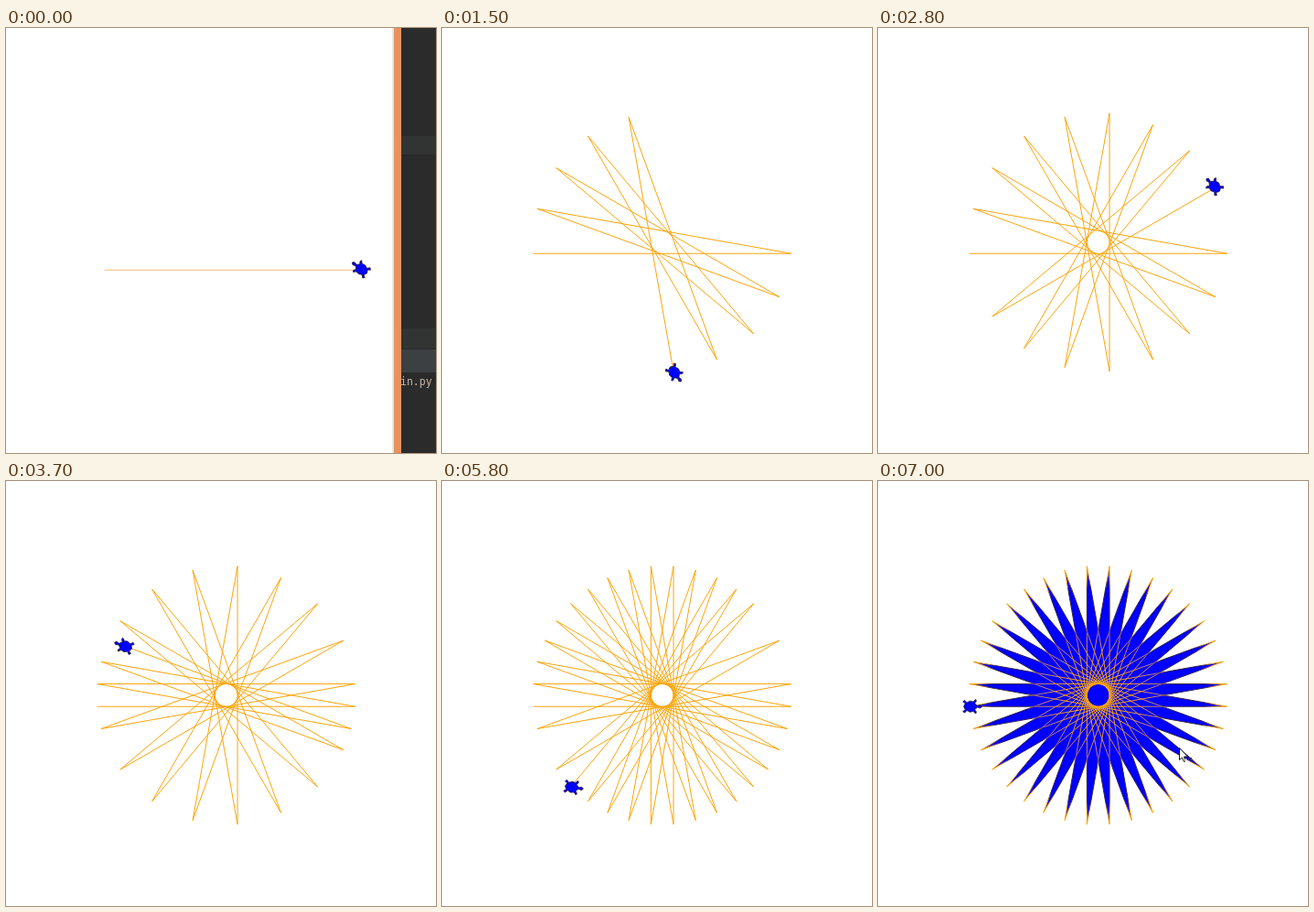
An HTML page with a canvas that plays this animation: 470x464 px, repeating every 7.1 s.

```html
<!DOCTYPE html>
<html lang="en">
<head>
<meta charset="utf-8">
<title>Turtle star</title>
<style>
  html, body { margin: 0; width: 100%; height: 100%; overflow: hidden; background: #fff; }
  canvas { display: block; }
</style>
</head>
<body>
<canvas id="stage" width="470" height="464"></canvas>
<script>
const ctx = document.getElementById('stage').getContext('2d');
const LOOP = 7100, STEP = 100;
const SIDES = 36, TURN = 170, TURN_SHARE = 0.45;
const CENTER = { x: 240.7, y: 233.9 }, RADIUS = 141.5;
const ORANGE = '#fba50a', BLUE = '#0000ff';
const FILL_TIME = 6600, POINTER_TIME = 7000;

// [time in ms, finished sides]; the fraction covers the turn, then the next side
const PACE = [[0, 1.38], [1500, 9.07], [2800, 16.28], [3700, 20.96],
              [4700, 26.38], [5800, 32.32], [6565, 36.45]];

// Right half of the turtle, from head to tail: [sideways, forward]
const HALF = [[0, 16], [2, 14], [1, 10], [4, 7], [7, 9], [9, 8], [6, 5],
              [7, 1], [5, -3], [8, -6], [6, -8], [4, -5], [0, -7]];
const SHELL = HALF.concat(HALF.slice(1, -1).reverse().map(([x, y]) => [-x, y]));
const POINTER = [[0, 0], [0, 13], [3, 10.5], [5, 15], [7, 14], [5, 9.5], [9, 9.5]];

const rad = deg => deg * Math.PI / 180;
const mix = (a, b, t) => a + (b - a) * t;

function corner(k) {
  const a = rad(185 + TURN * k);
  return { x: CENTER.x + RADIUS * Math.cos(a), y: CENTER.y - RADIUS * Math.sin(a) };
}

function phaseAt(time) {
  const i = PACE.findIndex(p => p[0] > time);
  if (i < 0) return PACE[PACE.length - 1][1];
  const [t0, p0] = PACE[i - 1], [t1, p1] = PACE[i];
  return mix(p0, p1, (time - t0) / (t1 - t0));
}

function poseAt(phase) {
  const done = Math.floor(phase), part = phase - done, from = corner(done);
  if (part <= TURN_SHARE || done >= SIDES) {
    const turned = Math.min(1, part / TURN_SHARE);
    return { done, ...from, heading: TURN * (done - 1 + turned) };
  }
  const to = corner(done + 1), f = (part - TURN_SHARE) / (1 - TURN_SHARE);
  return { done, x: mix(from.x, to.x, f), y: mix(from.y, to.y, f), heading: TURN * done };
}

function rect(color, x, y, w, h) {
  ctx.fillStyle = color;
  ctx.fillRect(x, y, w, h);
}

function polygon(points, fill, stroke, width = 1) {
  ctx.beginPath();
  points.forEach(([x, y]) => ctx.lineTo(x, y));
  ctx.closePath();
  ctx.fillStyle = fill;
  ctx.fill();
  if (stroke) {
    ctx.strokeStyle = stroke;
    ctx.lineWidth = width;
    ctx.stroke();
  }
}

function drawTrail(pose, ink) {
  ctx.beginPath();
  for (let k = 0; k <= pose.done; k++) {
    const p = corner(k);
    ctx.lineTo(p.x, p.y);
  }
  ctx.lineTo(pose.x, pose.y);
  ctx.strokeStyle = ink;
  ctx.lineWidth = 1;
  ctx.stroke();
}

function drawTurtle({ x, y, heading }) {
  ctx.save();
  ctx.translate(x, y);
  ctx.rotate(rad(90 - heading));
  ctx.scale(0.87, -0.87);
  polygon(SHELL, BLUE, '#2a1c30', 0.9);
  ctx.restore();
}

function filledInk() {
  const ink = ctx.createRadialGradient(CENTER.x, CENTER.y, 0, CENTER.x, CENTER.y, 142);
  [[0, ORANGE], [0.2, ORANGE], [0.46, '#c08068'], [0.56, '#33204c'],
   [0.82, '#33204c'], [0.92, ORANGE]].forEach(([at, c]) => ink.addColorStop(at, c));
  return ink;
}

function drawEditor() {
  rect('#e6e6e6', 422, 0, 2, 464);
  rect('#e8935f', 424, 0, 8, 464);
  rect('#2b2b2b', 432, 0, 38, 464);
  rect('#323333', 432, 118, 38, 20);
  rect('#323434', 432, 328, 38, 22);
  rect('#3d4042', 432, 351, 38, 25);
  ctx.fillStyle = '#c9b5a4';
  ctx.font = '11.5px "DejaVu Sans Mono", monospace';
  ctx.fillText('in.py', 431, 390);
}

function drawPointer() {
  ctx.save();
  ctx.translate(329.5, 291.5);
  polygon(POINTER, '#fff', '#111');
  ctx.restore();
  rect('#fff', 336, 303, 1, 3);
  rect('#222', 338, 302, 5, 1);
  rect('#222', 341, 304, 3, 1);
}

function draw(time) {
  const opening = time < STEP, filled = time >= FILL_TIME;
  const pose = poseAt(phaseAt(time));
  rect('#fff', 0, 0, 470, 464);
  if (opening) drawEditor();

  ctx.save();
  if (opening) ctx.translate(8, 18);
  if (filled) {
    const star = Array.from({ length: SIDES }, (_, k) => corner(k));
    polygon(star.map(p => [p.x, p.y]), BLUE);
  }
  drawTrail(pose, filled ? filledInk() : opening ? '#f6b676' : ORANGE);
  drawTurtle(pose);
  ctx.restore();

  if (time >= POINTER_TIME) drawPointer();
}

let start = null, shown = -1;
function tick(now) {
  if (start === null) start = now;
  const time = Math.floor((now - start) % LOOP / STEP) * STEP;
  if (time !== shown) draw(shown = time);
  requestAnimationFrame(tick);
}
draw(0);
requestAnimationFrame(tick);
</script>
</body>
</html>
```
